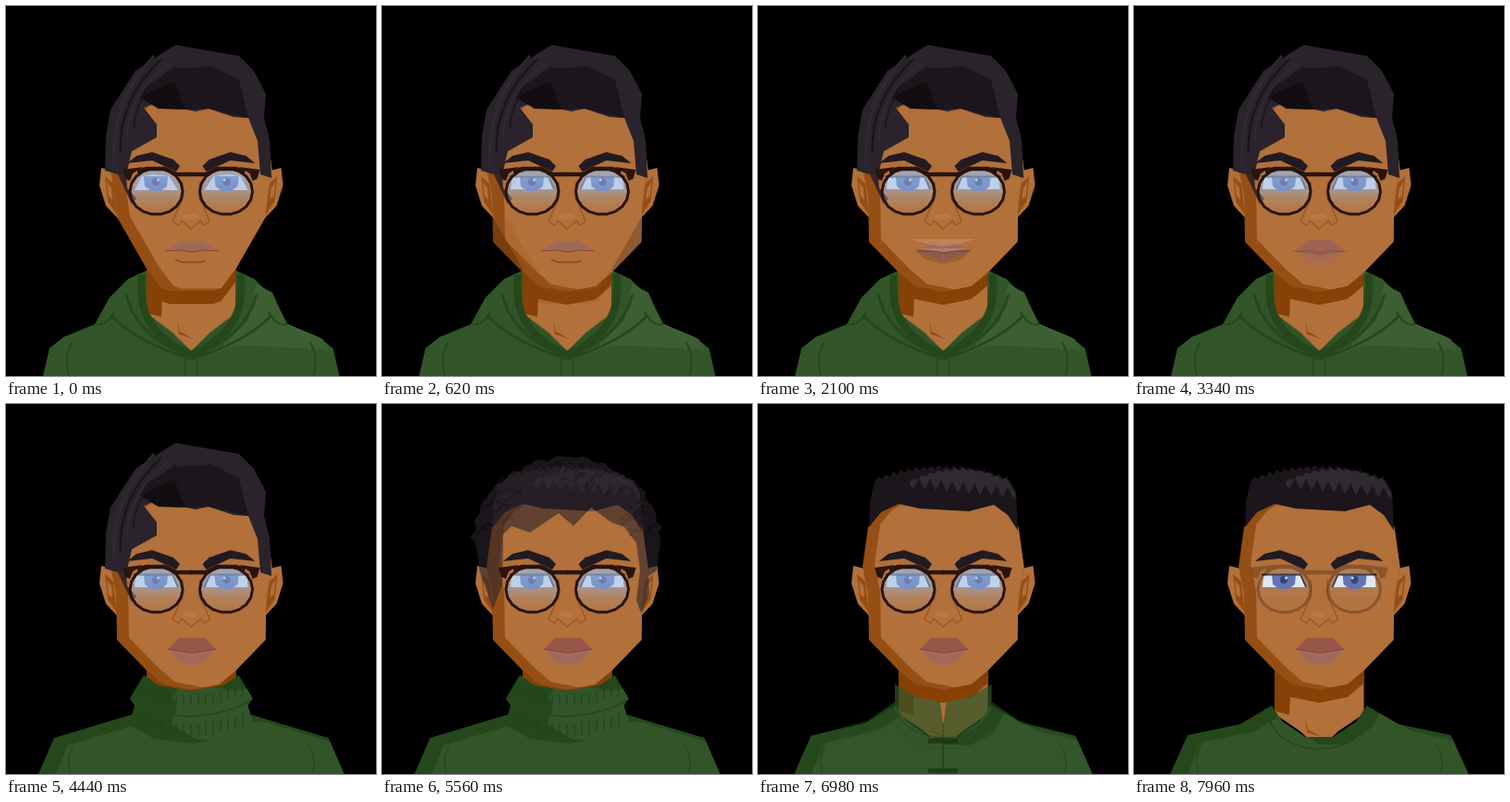
Recreate the animation shown at these times as an HTML page. Size 400x400 px, loop 8 s.

```html
<!DOCTYPE html>
<html lang="en">
<head>
<meta charset="utf-8">
<title>Portrait variations</title>
<style>
  html, body { margin: 0; width: 100%; height: 100%; overflow: hidden; background: #000; }
  svg { display: block; width: 100vw; height: 100vh; }
  .slot { isolation: isolate; }
  .slot > g { mix-blend-mode: plus-lighter; }
</style>
</head>
<body>
<svg id="stage" viewBox="0 0 400 400"></svg>
<script>
const LOOP = 8000, STEP = 60, STEPS = 10, WIDTH = 400.5;
const SKIN = '#b2703a', SHADE = '#954e14', DEEP = '#874006';
const HAIR = '#2a232b', HAIR_DARK = '#1c151b', HAIR_LIGHT = '#312932';
const GREEN = '#315528', GREEN_DARK = '#24481b', GREEN_LIGHT = '#3b5f32';
const FRAME = '#29140f';

const range = (n, f) => Array.from({ length: n }, (_, i) => f(i)).join(' ');
const poly = (pts, fill, more = '') => `<polygon points="${pts}" fill="${fill}" ${more}/>`;
const stroke = (d, color, width = 1.5) =>
  `<path d="${d}" fill="none" stroke="${color}" stroke-width="${width}" stroke-linejoin="round"/>`;
const both = s => s + `<g transform="matrix(-1 0 0 1 ${WIDTH} 0)">${s}</g>`;

// Closes a left half outline with its mirror image.
const sym = half => half + ' ' + half.split(' ').reverse()
  .map(p => p.split(',')).map(([x, y]) => `${WIDTH - x},${y}`).join(' ');

const arc = (cx, cy, rx, ry, from, to, n, wobble = () => 1) => range(n, i => {
  const a = from + (to - from) * i / (n - 1), k = wobble(i);
  return `${(cx + rx * k * Math.cos(a)).toFixed(1)},${(cy + ry * k * Math.sin(a)).toFixed(1)}`;
});

let seed = 7;
const rnd = () => (seed = (seed * 16807) % 2147483647) / 2147483647;

// Draws a shape moved by (dx, dy) that shows only inside another shape.
let clips = 0;
function inside(frame, pts, fill, dx, dy) {
  const id = 'clip' + clips++;
  return `<clipPath id="${id}"><polygon points="${frame}"/></clipPath>` +
    `<g clip-path="url(#${id})">${poly(pts, fill, `transform="translate(${dx} ${dy})"`)}</g>`;
}
const shaded = (pts, dark, light, dx, dy) => poly(pts, dark) + inside(pts, pts, light, dx, dy);

// Head and neck
const skull = '200,106 150,106 131,118 119,133 113,176 ';
const narrow = sym(skull + '121,230 152,284 168,305 176,308');
const wide = sym(skull + '119,205 120,255 152,288 170,303 200,309');
const neckShape = sym('152,270 152,335 180,354 203,376');
const neck = poly(neckShape, SKIN) +
  poly('152,284 169,312 168,336 152,332', DEEP) +
  poly('185,338 188,352 203,360 187,355', SHADE);
const head = shape => shaded(shape, SHADE, SKIN, 13, -2.5);
const chinShadow = shape => inside(neckShape, shape, DEEP, 0, 14);

const ears = both(
  poly('103,175 124,180 124,233 108,216 101,194', SKIN) +
  poly('107,184 116,192 120,226 110,211', SHADE) +
  poly('109,190 114,197 115,209 111,206', SKIN));

const nose = both(stroke('M191,190 L192,206 180,233 187,237 190,232 200.3,241', '#9a561f', 1.3)) +
  '<ellipse cx="200" cy="228" rx="8" ry="3" fill="#bd7847"/>';

// Lips follow one cupid's-bow rule; x offsets count from the middle.
function lips(half, peak, peakY, dipY, lineY, bottomY, upper, lower) {
  const x = k => 201 + k, corner = 265;
  const seam = `${x(half)},${corner} ${x(peak)},${lineY - 2} 201,${lineY} ${x(-peak)},${lineY - 2} ${x(-half)},${corner}`;
  return poly(`${seam} ${x(-peak)},${bottomY - 3} 201,${bottomY} ${x(peak)},${bottomY - 3}`, lower) +
    poly(`${seam} ${x(-peak)},${peakY} 201,${dipY} ${x(peak)},${peakY}`, upper) +
    stroke('M' + seam, '#87492f', 1.1);
}
const thinMouth = lips(29, 11, 253, 256, 266, 266, '#9e6b58', '#9e6b58') +
  stroke('M183,274 L190,277 210,277 216,275', '#8e4b18');
const plainMouth = lips(29, 10, 255, 258, 267, 275, '#9f6957', '#9f6957');
const pout = lips(29, 9, 252, 255, 267, 275, '#a06a58', '#a06a58');
const fullLips = lips(26, 14, 253, 253, 269, 282, '#96574a', '#a1695c');
const smile =
  poly(sym('165,252 185,258 200,260 200,279 180,274 169,262'), '#3b2614') +
  poly(sym('165,252 185,258 200,260 200,266 169,262'), '#ecd2cd');

// Eyes, brows and glasses
const iris = poly('149,184 175,184 174,195 167,200 157,200 150,195', '#5666ae') +
  '<circle cx="162" cy="190" r="4.2" fill="#222b58"/><circle cx="164.5" cy="188" r="1.5" fill="#e4e9ff"/>';
const wideEyes = both(poly('139,199 147,184 160,182 176,184 186,199', '#e6ebf4') + iris);
const calmEyes = both(poly('139,198 140,184 179,184 185,198', '#f2f3f6') + iris +
  stroke('M138,184.5 H180 L186,198', '#2c1c22', 1.8));
const brows = both(poly('131,170 141,162 158,158 181,166 188,173 184,179 158,167', '#211a22'));

const ring = arc(162.5, 200.5, 28.5, 25, 0, 2 * Math.PI, 19);
const glasses = both(
  poly(ring, 'url(#lens)', `stroke="${FRAME}" stroke-width="3"`) +
  poly('126,177 148,174 137,181 134,189 129,187', FRAME) +
  stroke('M142,179 L152,176 H172 L184,182 H201', FRAME, 4.5));

// Hair
const fringe = '272,146 262,121 246,120 219,111 205,114 190,111 165,110 158,106 149,110 163,128 163,142 136,157 ';
const sweptHair =
  poly('107,178 108,140 113,112 140,70 183,42 252,54 268,70 281,95 279,121 285,145 287,186 275,182 ' + fringe + '130,183 121,182', HAIR) +
  poly('145,99 152,86 182,68 222,65 252,80 262,121 219,111 190,112 165,111', HAIR_DARK) +
  poly('145,99 182,81 193,111 165,111', '#120d10') +
  poly('120,180 130,184 131,197 141,208 136,214', '#392426') +
  range(4, i => stroke(`M${117 + 7 * i},${172 - 13 * i} Q${112 + 9 * i},${105 - 4 * i} ${160 + 8 * i},${54 + 4 * i}`, i % 2 ? HAIR_DARK : HAIR_LIGHT, 3 - i / 2));

const tuft = () => 0.97 + 0.06 * rnd();
const curlyHair =
  poly('106,182 ' + arc(200, 150, 102, 92, Math.PI, 2 * Math.PI, 52, tuft) +
    ' 297,180 288,186 289,205 280,226 275,212 279,180 275,150 262,133 248,128 226,112 207,132 191,118 160,139 140,132 131,141 130,195 120,222', HAIR) +
  range(60, () => {
    const a = Math.PI * (1.05 + 0.9 * rnd()), r = 0.68 + 0.25 * rnd();
    const x = 200 + 102 * r * Math.cos(a), y = 150 + 92 * r * Math.sin(a);
    return stroke(`M${x - 6},${y + 4} L${x},${y - 3} ${x + 6},${y}`, rnd() < 0.4 ? HAIR_LIGHT : HAIR_DARK, 2);
  });

const spikes = (x, w, y, depth, n) => range(n, i => {
  const u = 2 * i / (n - 1) - 1;
  return `${x + w * (u + 1) / 2},${y + 14 * u * u + (i % 2 ? 0 : depth)}`;
});
const flatHair =
  poly('120,133 121,105 ' + spikes(126, 147, 66, 4, 37) + ' 279,95 281,137 270,120 255,109 228,116 175,113 152,108 133,117', HAIR_DARK) +
  poly(spikes(163, 109, 69, 3, 25) + ' 279,98 ' + range(19, i => `${276 - i * 6},${(i % 2 ? 90 : 102) - i * 0.6}`), HAIR_LIGHT);

// Clothes
const torso = half => shaded(sym(half), GREEN_DARK, GREEN, 15, 8) +
  both(stroke('M73,369 Q64,384 70,400', GREEN_DARK, 1.3));

const fold = k => `M${147 - 17 * k},${290 + 22 * k} Q${138 + 3 * k},${352 + 7 * k} 203,${378 + 2 * k}`;
const hoodShape = sym('40,400 47,370 62,358 96,344 112,315 132,295 152,286 152,332 180,353 203,376');
const hoodie = poly(hoodShape, GREEN) +
  poly('270,300 288,310 303,343 342,360 350,372 250,366 225,376 262,340', GREEN_LIGHT) +
  both(stroke(fold(0), GREEN_DARK, 8) + stroke(fold(1), GREEN_DARK, 3) + stroke(fold(2), GREEN_DARK, 3) +
    stroke('M96,344 Q110,346 117,330', GREEN_DARK, 2) +
    stroke('M72,363 Q62,380 68,400', GREEN_DARK, 2) +
    stroke('M194,378 V400', GREEN_DARK, 1.5));

const collar = sym('200,310 165,304 149,293 134,318 139,326 133,347 160,362 200,367');
const turtleneck = torso('35,400 52,361 135,336') +
  shaded(collar, GREEN_DARK, GREEN, 46, 0) +
  both(stroke('M135,320 Q160,335 201,338', GREEN_DARK, 1.8)) +
  range(15, i => {
    const x = 144 + i * 8, y = 302 + 12 * Math.sin(Math.PI * (i + 1) / 16);
    return stroke(`M${x},${y} v11 m0,20 v13`, '#1f4019', 1);
  });

const mandarin = torso('39,400 57,359 118,343 148,322 160,348 186,361') +
  poly(sym('200,345 197,322 175,318 148,303 148,331 160,348 186,361'), GREEN) +
  both(stroke('M148,331 Q160,358 201,361', GREEN_DARK, 1.8)) +
  stroke('M200,345 V400 M184,364.5 H216 M184,396.5 H216', '#1a3712', 1.5) +
  stroke('M184,364.5 H216 M184,396.5 H216', '#17300f', 5);

const tshirt = torso('39,400 58,358 115,346 149,326 160,343 185,360') +
  both(stroke('M142,329 Q152,372 201,373', GREEN_DARK, 1.5));

// Each slot lists its looks and the moment each later look begins to fade in.
const slots = [
  { looks: [neck] },
  { looks: [narrow, wide].map(chinShadow), starts: [200] },
  { looks: [hoodie, turtleneck, mandarin, tshirt], starts: [3900, 6120, 6860] },
  { looks: [ears] },
  { looks: [narrow, wide].map(head), starts: [200] },
  { looks: [nose] },
  { looks: [thinMouth, smile, plainMouth, pout, fullLips], starts: [940, 1680, 2420, 3160] },
  { looks: [wideEyes, calmEyes], starts: [200] },
  { looks: [sweptHair, curlyHair, flatHair], starts: [4640, 5380] },
  { looks: [brows] },
  { looks: [glasses, ''], starts: [7600] }
];

const stage = document.getElementById('stage');
stage.innerHTML = `<defs><linearGradient id="lens" x1="0" y1="0" x2="0" y2="1">
  <stop offset="0" stop-color="#9cc0ea" stop-opacity=".7"/>
  <stop offset=".45" stop-color="#9bb6dc" stop-opacity=".55"/>
  <stop offset=".7" stop-color="#b0a8a4" stop-opacity=".32"/>
  <stop offset="1" stop-color="#bc9478" stop-opacity=".12"/>
</linearGradient></defs>` +
  slots.map(s => `<g class="slot">${s.looks.map(l => `<g>${l}</g>`).join('')}</g>`).join('');
stage.querySelectorAll('.slot').forEach((el, i) => { slots[i].nodes = [...el.children]; });

function fade(t, start) {
  const k = Math.floor((t - start) / STEP) + 1;
  return Math.min(STEPS, Math.max(0, k)) / STEPS;
}

function draw(t) {
  for (const { nodes, starts = [] } of slots) {
    nodes.forEach((node, i) => {
      const shown = i ? fade(t, starts[i - 1]) : 1;
      const gone = i < starts.length ? fade(t, starts[i]) : 0;
      const opacity = shown - gone;
      node.style.display = opacity > 0 ? '' : 'none';
      node.style.opacity = opacity;
    });
  }
}

const begin = performance.now();
function tick() {
  draw((performance.now() - begin) % LOOP);
  requestAnimationFrame(tick);
}
tick();
</script>
</body>
</html>
```
